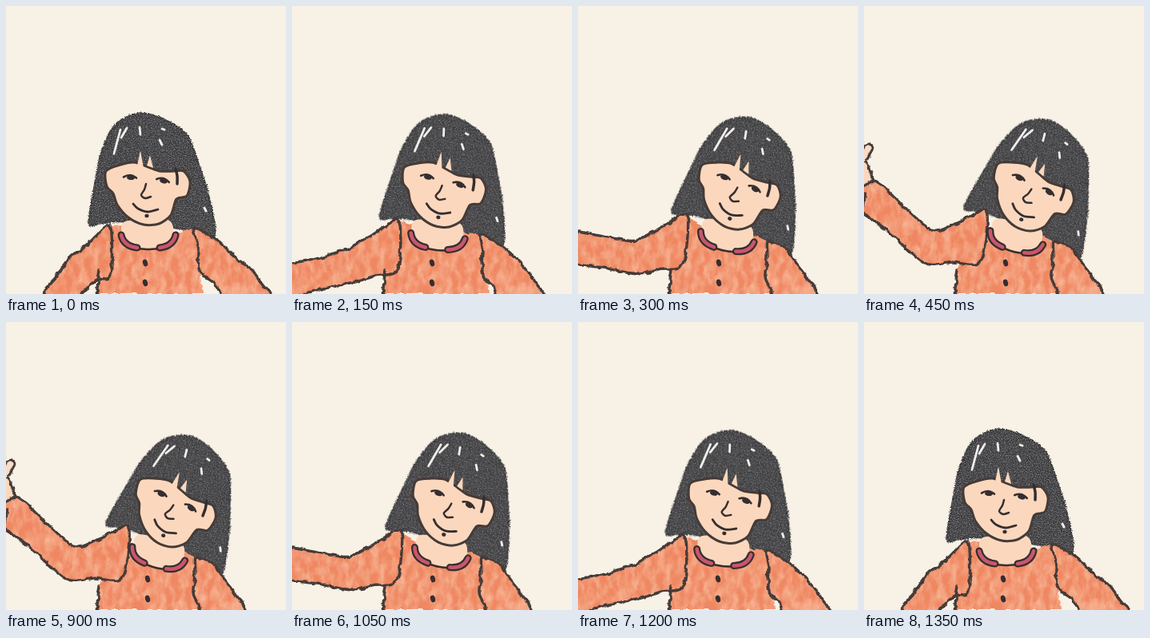
Write an HTML page that moves like this. It is 350 px wide and 361 px high and loops after 1500 ms.

```html
<!DOCTYPE html>
<html lang="en">
<head>
<meta charset="utf-8">
<title>Waving girl</title>
<style>
html, body { margin: 0; width: 100%; height: 100%; overflow: hidden; background: #f8f1e6; }
svg { display: block; width: 100%; height: 100%; }
.ink, .dark, .pink, .shine { fill: none; stroke-linecap: round; stroke-linejoin: round; }
.ink { stroke: #453b38; stroke-width: 3.4; }
.dark { stroke: #352e30; }
.pink { stroke: #c9566c; }
.shine { stroke: #f1eeec; }
.spot { fill: #352e30; }
.cloth { fill: #ef8862; }
.skin { fill: #fbd8bd; }
.hair { fill: #3b3a3c; stroke: #343335; stroke-width: 3; stroke-linejoin: round; }
</style>
</head>
<body>
<svg id="stage" viewBox="0 0 350 361" preserveAspectRatio="none">
  <defs>
    <filter id="grain" x="-5%" y="-5%" width="110%" height="110%" color-interpolation-filters="sRGB">
      <feTurbulence type="fractalNoise" baseFrequency=".8" numOctaves="2" seed="4" result="n"/>
      <feColorMatrix in="n" values="0 0 0 0 .62  0 0 0 0 .62  0 0 0 0 .63  2 0 0 0 -.85" result="dots"/>
      <feDisplacementMap in="SourceGraphic" in2="n" scale="4" xChannelSelector="R" yChannelSelector="G" result="edge"/>
      <feComposite in="dots" in2="edge" operator="atop"/>
    </filter>
    <filter id="crayon" x="-5%" y="-5%" width="110%" height="110%" color-interpolation-filters="sRGB">
      <feTurbulence type="fractalNoise" baseFrequency=".12 .06" numOctaves="3" seed="9"/>
      <feColorMatrix values="0 0 0 0 .98  0 0 0 0 .76  0 0 0 0 .64  1.5 0 0 0 -.5" result="wash"/>
      <feComposite in="wash" in2="SourceGraphic" operator="atop"/>
    </filter>
    <filter id="pencil" filterUnits="userSpaceOnUse" x="-20" y="0" width="390" height="380" color-interpolation-filters="sRGB">
      <feTurbulence type="fractalNoise" baseFrequency=".09" numOctaves="3" seed="2" result="n"/>
      <feDisplacementMap in="SourceGraphic" in2="n" scale="6" xChannelSelector="R" yChannelSelector="G"/>
    </filter>
  </defs>
</svg>
<script>
const STEP = 150;
const LAST = 4;
const stage = document.getElementById('stage');

const points = text => text.split(' ').map(s => s.split(',').map(Number));
const mix = (a, b, t) => a.map((v, i) => v + (b[i] - v) * t);
const mixAll = (a, b, t) => a.map((p, i) => mix(p, b[i], t));
const put = (x, y, turn) => `transform="translate(${x} ${y}) rotate(${turn})"`;

// Smooth path through points.
function curve(p, closed) {
  const n = p.length;
  const at = i => closed ? p[(i + n) % n] : p[Math.max(0, Math.min(n - 1, i))];
  let d = `M${p[0]}`;
  for (let i = 0; i < n - !closed; i++) {
    const [a, b, c, e] = [-1, 0, 1, 2].map(k => at(i + k));
    d += `C${b.map((v, k) => v + (c[k] - a[k]) / 7)} ${c.map((v, k) => v - (e[k] - b[k]) / 7)} ${c}`;
  }
  return d + (closed ? 'Z' : '');
}
const path = (d, cls, width) =>
  `<path class="${cls}" d="${d}"${width ? ` style="stroke-width:${width}"` : ''}/>`;
const line = (text, cls, width) => path(curve(points(text)), cls, width);
const blob = (text, cls, width) => path(curve(points(text), true), cls, width);
const oval = (x, y, rx, ry, turn = 0) =>
  `<ellipse class="spot" rx="${rx}" ry="${ry}" ${put(x, y, turn)}/>`;

// The head is drawn upright around the chin at 176,262.
const HAIR = `<g filter="url(#grain)">${blob('166,135 137,149 120,182 112,220 104,272 118,272 150,270 212,278 259,289 253,238 241,200 226,162 197,142', 'hair')}</g>`
  + [[143, 155, -8, 30], [151, 153, -7, 12], [167, 152, 1, 9], [192, 168, 3, 6], [198, 155, -3, -1], [248, 253, 2, 4]]
    .map(([x, y, dx, dy]) => path(`M${x} ${y}l${dx} ${dy}`, 'shine', 2.8)).join('');

const eye = (x, y, turn) =>
  `<g ${put(x, y, turn)}>${path('M-8 0Q0-6 8 0', 'dark', 2.6)}${oval(1, 0, 5, 3)}</g>`;

const FACE_SHAPE = '125,207 143,199 160,196 178,202 192,207 210,207 222,207 230,220 226,238 213,242 206,262 191,273 172,274 153,265 139,249 134,235 126,226';
const FACE = blob(FACE_SHAPE, 'skin') + blob(FACE_SHAPE, 'ink', 3)
  + [168, 180].map(x => path(`M${x - 4} 200L${x} ${x + 13 - (x - 168) / 2}L${x + 4} 203Z`, 'skin')).join('')
  + line('212,204 214,213 214,223', 'dark', 3.5)
  + eye(155, 215, 4) + eye(196, 219, 14)
  + line('175,223 173,230 169,237 174,241 181,239', 'dark', 2.5)
  + line('159,248 165,254 177,258 190,255', 'dark', 2.8)
  + oval(176, 263, 2.6, 2.3);

const COLLAR = blob('-29,-26 -32,-8 -20,6 0,8 18,6 31,-8 24,-28', 'skin')
  + line('-14,8 0,9 14,8', 'dark', 2.5)
  + [-1, 1].map(s => {
    const side = `M${s * 34}-9Q${s * 31} 5 ${s * 14} 7`;
    return path(side, 'dark', 9) + path(side, 'pink', 4.5);
  }).join('');

// Five fingers fan out from the palm; the wrist is at 0,0.
function hand() {
  let fingers = '';
  for (let i = 0; i < 5; i++) {
    const a = (-36 + 22 * i) * Math.PI / 180;
    const reach = 43 - 0.4 * i * i;
    fingers += `M0-20L${reach * Math.sin(a)} ${-20 - reach * Math.cos(a)}`;
  }
  const palm = 'M-15 0Q-28-30 0-42Q28-30 16 0Z';
  return path(fingers, 'ink', 14) + path(palm, 'ink', 6)
    + path(fingers, 'ink', '8;stroke:#fbdcc5') + path(palm, 'skin');
}

// Waving arm per step: seam top, seam base, elbow, wrist.
const ARMS = [
  '130,276 131,336 92,333 62,372',
  '133,269 132,330 72,326 -10,346',
  '136,262 131,323 73,315 -10,302',
  '153,258 145,320 81,302 1,234',
  '157,262 128,319 98,245 76,150'
].map(points);

// Sleeve on the still side, hanging and leaning.
const HANG = points('235,278 240,300 241,331 262,349 276,368 330,368 318,345 303,326 290,318 265,295');
const LEAN = points('236,295 236,315 234,340 241,354 248,368 299,368 289,345 275,325 262,307 248,298');

const unit = (a, b) => {
  const d = Math.hypot(b[0] - a[0], b[1] - a[1]);
  return [(b[0] - a[0]) / d, (b[1] - a[1]) / d];
};
const offset = ([x, y], [dx, dy], w) => [x - dy * w, y + dx * w];

function sleeve([top, base, elbow, wrist]) {
  const upper = unit(mix(top, base, 0.5), elbow);
  const fore = unit(elbow, wrist);
  const bend = unit([0, 0], [upper[0] + fore[0], upper[1] + fore[1]]);
  const edge = (end, side) => {
    const e = offset(elbow, bend, 21 * side);
    const w = offset(wrist, fore, 18 * side);
    return [end, mix(end, e, 0.5), e, mix(e, w, 0.5), w];
  };
  return { fore, shape: [...edge(top, 1), ...edge(base, -1).reverse()] };
}

function drawPose(k) {
  const lean = Math.sin(k / LAST * Math.PI / 2);
  const arm = ARMS[k];
  const [top, , , wrist] = arm;
  const { fore, shape } = sleeve(arm);
  const still = mixAll(HANG, LEAN, Math.min(1, k / 2));
  const torso = [top, [150, 275], [215, 285], still[0], [246, 361], [113, 361], [117, 330]];
  const sleeves = [shape, still].map(p => curve(p, true));
  const headAt = `${put(176 + 7 * k, 262 + 5 * lean, 21.5 * lean).slice(0, -1)} translate(-176 -262)"`;

  let raised = '';
  if (wrist[1] < 260) {
    const turn = Math.atan2(fore[0], -fore[1]) * 180 / Math.PI;
    const cuff = offset(wrist, fore, -14).map((v, i) => v - fore[i] * 9);
    raised = `<g ${put(wrist[0] + fore[0] * 8, wrist[1] + fore[1] * 8, turn * 0.45)}>${hand()}</g>`
      + path(`M${cuff}L${mix(cuff, wrist, 0.9)}`, 'ink', 2.8);
  }
  const [palm, cuffLine = ''] = raised.split('</g>');

  return `<g ${headAt}>${HAIR}</g>`
    + `<g filter="url(#pencil)">${palm && palm + '</g>'}`
    + `<g filter="url(#crayon)">${path(`M${torso.join('L')}Z`, 'cloth')}${sleeves.map(d => path(d, 'cloth')).join('')}</g>`
    + sleeves.map(d => path(d, 'ink')).join('') + cuffLine
    + line('117,330 115,345 113,364', 'ink') + '</g>'
    + `<g ${put(178 + 3.5 * k, 296 + k, 16 * lean)}>${COLLAR}</g>`
    + [322, 347].map(y => oval(174 + k, y, 3, 4.5, -15)).join('')
    + `<g ${headAt}>${FACE}</g>`;
}

const groups = ARMS.map((_, k) => {
  const g = document.createElementNS('http://www.w3.org/2000/svg', 'g');
  g.innerHTML = drawPose(k);
  stage.append(g);
  return g;
});

// Steps run up to the raised hand and back, holding at both ends.
function render(time) {
  const step = Math.floor(time / STEP) % (2 * LAST + 2);
  const now = Math.min(step, 2 * LAST + 1 - step);
  groups.forEach((g, k) => { g.style.display = k === now ? '' : 'none'; });
}

let start;
function tick(time) {
  start ??= time;
  render(time - start);
  requestAnimationFrame(tick);
}
render(0);
requestAnimationFrame(tick);
</script>
</body>
</html>
```
